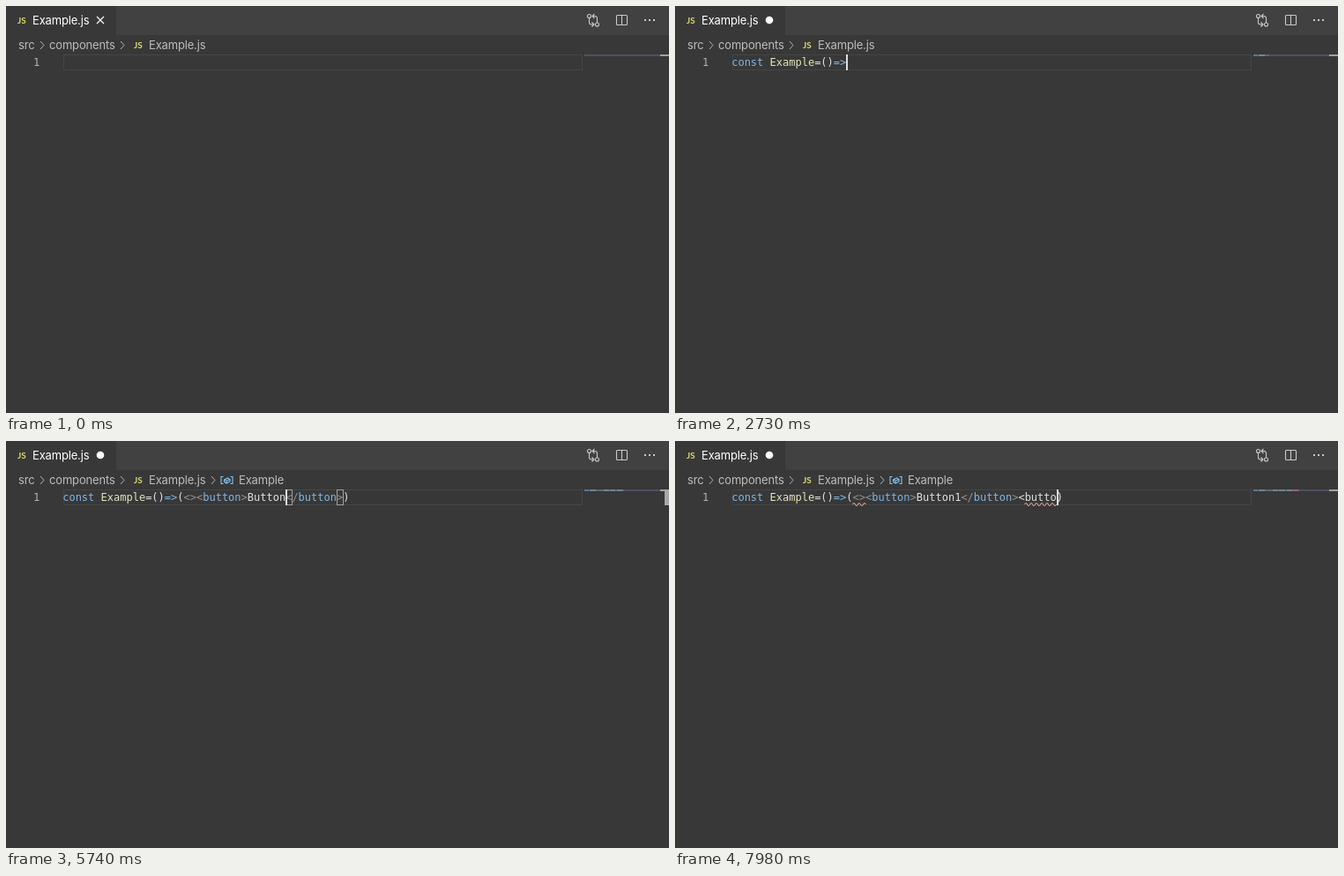
An HTML page that plays this animation: 752 px wide and 462 px high, repeating every 8000 ms.

```html
<!DOCTYPE html>
<html lang="en">
<meta charset="utf-8">
<title>Typing a component</title>
<style>
  html, body { margin: 0; width: 100%; height: 100%; overflow: hidden; background: #383838; }
  svg { display: block; }
  text { white-space: pre; }
  .ui { font: 13px Inter, sans-serif; letter-spacing: -.17px; fill: #bcbcbc; }
  .js { font: bold 10px Lato, sans-serif; fill: #d9d96c; }
  .code { font: 12px "DejaVu Sans Mono", monospace; fill: #e0e0e0; }
  .line { fill: none; stroke: #c9c9c9; stroke-width: 1.1; }
  .thin { fill: none; stroke: #b0b0b0; }
  .keyword { fill: #7fb5e4; }
  .function { fill: #e3e2ba; }
  .variable { fill: #a6dafa; }
  .angle { fill: #929292; }
  .match { fill: none; stroke: #a0a0a0; }
  .error { fill: none; stroke: #e59a90; stroke-width: 1.1; }
</style>
<svg width="752" height="462" viewBox="0 0 752 462">
  <rect width="752" height="462" fill="#383838"/>
  <rect x="125" width="627" height="33" fill="#414141"/>
  <text class="js" x="13" y="20">JS</text>
  <text class="ui" x="30" y="21" style="fill:#fff">Example.js</text>
  <path id="close" class="line" style="stroke:#fff" d="M103 12l8 8m0-8l-8 8"/>
  <circle id="dirty" cx="107" cy="16" r="4.3" fill="#fff"/>

  <g class="line">
    <circle cx="661.5" cy="11.5" r="2"/>
    <circle cx="670.5" cy="21" r="2"/>
    <path d="M661.5 13.5v5q0 2.5 2.5 2.5h3m-2.500-2.500l2.500 2.500l-2.500 2.500M670.500 19v-5q0-2.500-2.500-2.500h-3m2.500-2.500l-2.500 2.500l2.500 2.500"/>
    <rect x="692.5" y="10.500" width="12" height="11" rx="1"/>
    <path d="M698.500 10.500v11"/>
  </g>
  <path d="M724 16h2m3 0h2m3 0h2" stroke="#c9c9c9" stroke-width="2"/>

  <text class="ui" x="14" y="49">src</text>
  <text class="ui" x="49" y="49">components</text>
  <text class="js" x="145" y="48">JS</text>
  <text class="ui" x="162" y="49">Example.js</text>
  <path class="thin" d="M39 40l4 4.500l-4 4.500M130 40l4 4.500l-4 4.500"/>
  <g id="symbol">
    <path class="thin" d="M233 40l4 4.500l-4 4.500"/>
    <path class="line" style="stroke:#86c5f0" d="M246.500 40.500h-2.500v8h2.500m8-8h2.500v8h-2.500M247.500 44l4-2l2.500 1.500v2.500l-4 2l-2.500-1.500zl2.500 1.200l4-1.700m-4 1.700v2.800"/>
    <text class="ui" x="264" y="49">Example</text>
  </g>

  <rect x="65.500" y="55.500" width="588" height="17" fill="none" stroke="#454545"/>
  <text class="code" x="31" y="68" style="fill:#b4b4b4">1</text>
  <rect x="656" y="55" width="86" height="2" fill="#50505f"/>
  <rect x="742" y="55" width="10" height="2" fill="#a2a2a2"/>
  <g id="editor"></g>
</svg>
<script>
const LOOP = 8000, LEFT = 64.2, CHAR = 7.224;
const ERROR_TIME = 6300, SYMBOL_TIME = 3000;

// Bursts of keys: start, interval, keys (→ moves the caret right)
const bursts = [
  [70, 118, 'const Example='], [1820, 210, '()'], [2520, 170, '=>'], [2940, 0, '('],
  [3710, 70, '<>'], [3920, 130, '<button>'], [5180, 100, 'Button'], [5950, 0, '1'],
  [6230, 77, '→→→→→→→→'], [6880, 0, '→'], [7140, 168, '<butto']
];
const keys = bursts.flatMap(([start, gap, text]) =>
  [...text].map((key, i) => ({ time: start + i * gap, key })));

const byId = id => document.getElementById(id);
const columnX = column => LEFT + column * CHAR;
const show = (id, on) => byId(id).style.display = on ? '' : 'none';
const rect = (x, y, w, h, fill) =>
  `<rect x="${x}" y="${y}" width="${w}" height="${h}" fill="${fill}"/>`;
const escapeText = s => s.replace(/</g, '&lt;').replace(/>/g, '&gt;');
const span = (type, s) => `<tspan class="${type}">${escapeText(s)}</tspan>`;

function typeKeys(time) {
  let text = '', caret = 0, last = -500;
  for (const { time: at, key } of keys) {
    if (at > time) break;
    last = at;
    if (key !== '→' && !(key === ')' && text[caret] === ')')) {
      let added = key === '(' ? '()' : key;
      if (key === '>' && text.slice(0, caret).endsWith('<button')) added += '</button>';
      text = text.slice(0, caret) + added + text.slice(caret);
    }
    caret++;
  }
  return { text, caret, last };
}

function highlight(text) {
  const nameType = text.includes('=>') ? 'function' : 'variable';
  return text.replace(/(const )|=>|<\/?\w*>|\w+|[^\w]/g, (token, keyword, at) => {
    if (keyword || token === '=>') return span('keyword', token);
    if (/^<.*>$/.test(token)) {
      const [, open, name] = token.match(/(<\/?)(\w*)/);
      return span('angle', open) + span('keyword', name) + span('angle', '>');
    }
    return at < 14 && /\w/.test(token) ? span(nameType, token) : escapeText(token);
  });
}

function matchingPair(text, caret) {
  const stack = [], pairs = [];
  [...text].forEach((c, i) => {
    if (c === '(' || c === '<') stack.push(i);
    const open = { ')': '(', '>': '<' }[c];
    if (open && text[i - 1] !== '=' && text[stack.at(-1)] === open) pairs.push([stack.pop(), i]);
  });
  return pairs.find(p => p.includes(caret - 1)) || pairs.find(p => p.includes(caret));
}

function matchBoxes([a, b]) {
  const spans = b === a + 1 ? [[a, 2]] : [[a, 1], [b, 1]];
  return spans.map(([column, n]) => `<rect class="match" x="${Math.round(columnX(column)) + .5}"
    y="55.5" width="${Math.round(n * CHAR)}" height="17"/>`).join('');
}

function squiggle(from, to) {
  let d = `M${columnX(from)} 72`;
  for (let x = columnX(from), i = 0; x + 3 <= columnX(to) + 1; x += 3, i++)
    d += `q1.5 ${i % 2 ? 3 : -3} 3 0`;
  return `<path class="error" d="${d}"/>`;
}

function miniature(text) {
  return [...text].map((c, i) => c === ' ' ? '' :
    rect(656 + i, 55, 1, 2, i < 5 ? '#587894' : /\w/.test(c) ? '#718590' : '#62686f')).join('');
}

function draw(time) {
  const { text, caret, last } = typeKeys(time);
  const failed = time >= ERROR_TIME;
  const pair = matchingPair(text, caret);
  let out = miniature(text);

  if (pair) out += matchBoxes(pair) + rect(747, 55, 5, 18, failed ? '#d0a9a6' : '#a8a8a8');
  out += `<text class="code" x="${LEFT}" y="68">${highlight(text)}</text>`;
  if (failed) {
    const open = text.search(/<\w*\)$/), end = text.length - 1;
    out += squiggle(19, 21);
    out += open < 0 ? squiggle(end, end + 1) : squiggle(open + 1, Math.max(end, open + 2));
    if (open >= 0) out += rect(656 + open, 55, 6, 2, '#a06070');
  }
  if ((time - last) % 1000 < 500 && text) out += rect(Math.round(columnX(caret)), 55, 2, 18, '#dedede');

  byId('editor').innerHTML = out;
  show('close', !text);
  show('dirty', text);
  show('symbol', time >= SYMBOL_TIME);
}

function tick() {
  draw(performance.now() % LOOP);
  requestAnimationFrame(tick);
}
tick();
</script>
</html>
```
